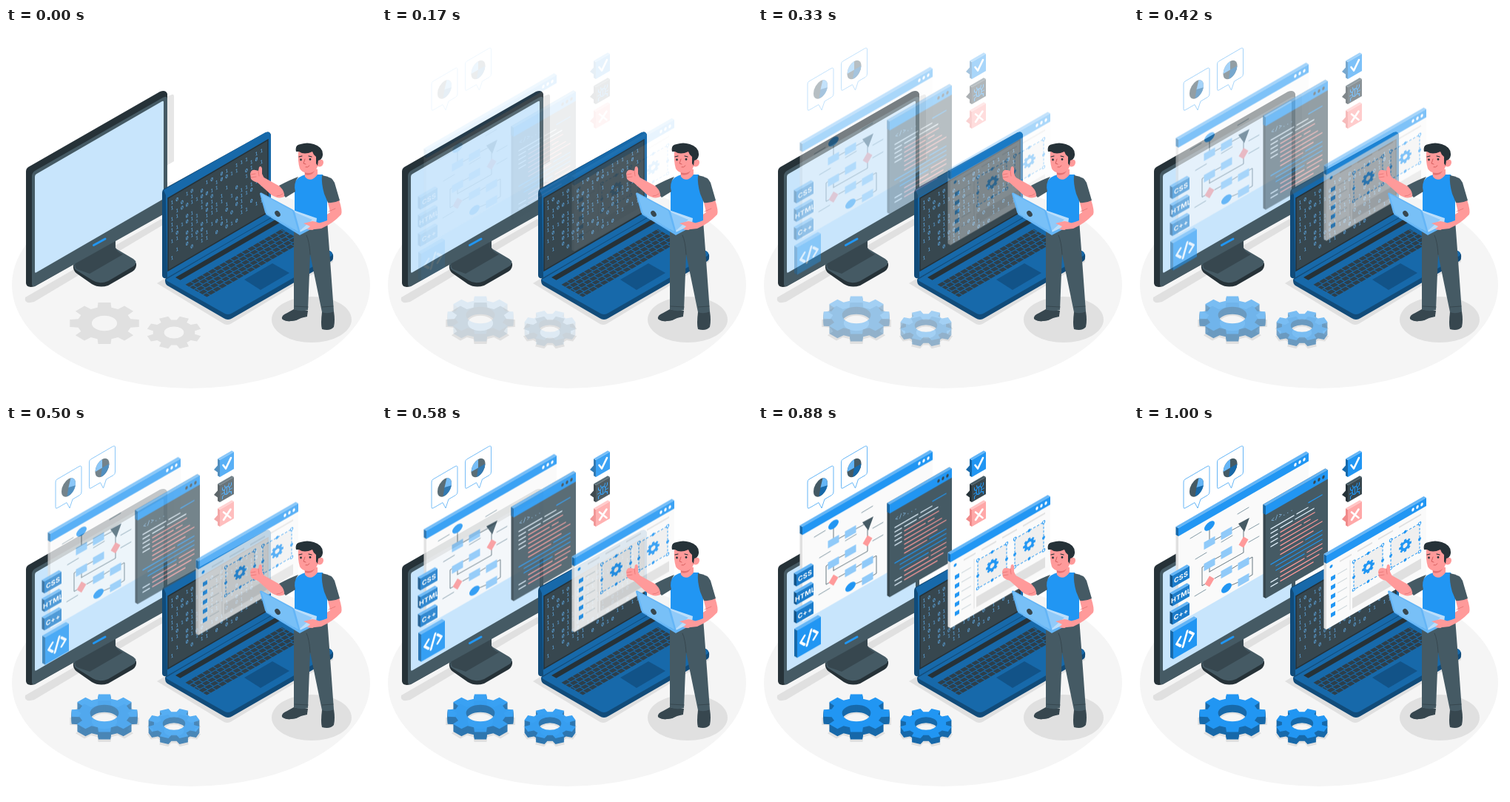
Recreate the animation shown at these times as an HTML page. Size 500 px wide and 500 px high, loop 1040 ms.

```html
<!DOCTYPE html>
<html lang="en">
<head>
<meta charset="utf-8">
<title>Development scene</title>
<style>
html, body { margin: 0; width: 100%; height: 100%; overflow: hidden; background: #fff; }
svg { display: block; width: 100vw; height: 100vh; }
.wall { transform: skewY(-30deg); }
.fade, .rise { animation: fade 1.04s infinite; }
.rise { animation-name: rise; }
@keyframes fade {
  0% { opacity: 0; animation-timing-function: cubic-bezier(.36, -.01, .5, 1.38); }
  96.15%, 100% { opacity: 1; }
}
@keyframes rise {
  0% { opacity: 0; transform: translateY(30px); animation-timing-function: cubic-bezier(.36, -.01, .5, 1.38); }
  96.15%, 100% { opacity: 1; transform: none; }
}
.line { fill: none; stroke-linecap: round; stroke-linejoin: round; }
.tag { font: 700 9px Inter, Roboto, sans-serif; fill: #fff; text-anchor: middle; letter-spacing: .2px; }
.bits { font: 6.5px "Noto Sans Mono", "DejaVu Sans Mono", monospace; fill: #64b5f6; text-anchor: middle; }
</style>
</head>
<body>
<svg viewBox="0 0 500 500">
  <defs>
    <rect id="step" class="wall" x="-7.5" y="-5" width="15" height="10" fill="#90caf9"/>
    <ellipse id="end" class="wall" rx="7" ry="5.5" fill="#2196f3"/>
    <path id="choice" class="wall" d="M0-7.5 6.5 0 0 7.5-6.5 0Z" fill="#ff9a9a"/>
    <path id="bubble" fill="#fff" stroke="#64b5f6" d="M69 72 99 54.5Q102 53 102 56V89Q102 92 99.5 93.5L90 99 86 111 82 103.5 69 111Q67 112 67 109.5V76Q67 73 69 72Z"/>
    <g id="frame">
      <path fill="#e0e0e0" fill-opacity=".45" d="M0 0H39V38H0Z"/>
      <path fill="none" stroke="#2196f3" stroke-dasharray="3 2" d="M0 0H39V38H0Z"/>
      <g fill="#fff" stroke="#2196f3"><circle r="1.7"/><circle cx="39" r="1.7"/><circle cy="38" r="1.7"/><circle cx="39" cy="38" r="1.7"/></g>
      <g fill="#2196f3"><circle cx="19.5" r="2"/><circle cy="21" r="2"/><circle cx="39" cy="21" r="2"/><circle cx="19.5" cy="38" r="2"/></g>
    </g>
  </defs>

  <ellipse cx="250" cy="347" rx="242" ry="140" fill="#f5f5f5"/>
  <g fill="#e0e0e0">
    <path d="M26 364 210 258 214 265 38 370Q24 374 26 364Z"/>
    <path fill="#e6e6e6" d="M217 93 224 90Q227 89 227 93V180L217 186Z"/>
    <path d="M204 345 217 337 300 388 442 310V316L305 399Q299 403 293 399Z"/>
    <ellipse cx="413" cy="394" rx="54" ry="31"/>
    <g id="gearShadows"></g>
  </g>

  <!-- monitor -->
  <path fill="#263238" d="M91 320Q90 328 96 332L116 346Q126 352 138 348L171 329Q177 325 176 318L150 300 105 310Z"/>
  <path fill="#455a64" d="M92 320Q90 316 96 313L140 290 150 299 172 312Q179 317 172 322L138 342Q126 347 117 341L96 328Q91 325 92 320Z"/>
  <path fill="#37474f" d="M95 316 107 310 148 285V297Q149 302 158 306L113 332 96 326Q91 321 95 316Z"/>
  <path fill="#263238" d="M27 194Q27 190 30 188L208 86Q216 83 218 89V244Q218 248 214 250L39 349Q28 352 27 345Z"/>
  <path fill="#455a64" d="M35 200Q35 196 39 193L212 94Q218 91 218 96V244Q218 249 214 251L39 349Q35 350 35 346Z"/>
  <path fill="#c8e5fc" d="M39 201Q39 198 41.500 197L211 99Q213 98 213 100V229Q213 231 211 232L41.500 330Q39 332 39 329Z"/>
  <path class="line" stroke="#2196f3" stroke-width="3" d="M118.500 293.500 134 285"/>

  <!-- open laptop -->
  <path fill="#114b79" d="M215 341Q215 338 218 337L358 256 439 302Q443 305 442 311 442 314 438 316L306 392Q300 396 294 392L218 348Q215 346 215 341Z"/>
  <path fill="#1769aa" d="M216 340 358 256 439 302Q444 306 438 309L306 385Q300 389 294 385L218 342Z"/>
  <g transform="matrix(1 -.577 1 .577 229 337)"><path fill="#263238" d="M0 0H135V6.500H0Z"/></g>
  <g id="keys" transform="matrix(1 -.577 1 .577 242 346.500)"></g>
  <path fill="#125388" d="M322 340 360 318 383 331 344 354Z"/>
  <path fill="#114b79" d="M211 223Q211 219 214 217L351 141Q357 139 358 145V257L217 338Q211 339 211 334Z"/>
  <path fill="#1769aa" d="M213 219 351 141Q357 139 358 145V256L218 337 216 226Z"/>
  <path fill="#37474f" stroke="#263238" stroke-width="1.500" d="M219 230 354 151V249L219 328Z"/>
  <g transform="translate(219 229)"><g class="wall bits" id="bits"></g></g>

  <!-- back window -->
  <g class="rise">
    <g data-win="60,138,176,128,11,#fafafa,#e0e0e0,#fff"></g>
    <path class="line" stroke="#455a64" stroke-width=".8" d="M102 140V155M109 154 118 149M132 141 143 135M148 142V153M148 163V171L102 197M109 180 118 175M102 190V197M132 193 140 188M155 180 160 177V201L155 204M95 189 92 191V216L97 213M109 206 118 201M132 215 141 211"/>
    <path class="line" stroke="#78909c" stroke-width=".9" d="M76 152 91 143M140 119 155 110M155 140 169 132M155 157 169 149M83 180 98 171M118 157 133 148M82 230 97 221"/>
    <use href="#end" x="102" y="135"/><use href="#end" x="125" y="219"/>
    <use href="#step" x="102" y="158"/><use href="#step" x="125" y="145"/>
    <use href="#step" x="102" y="187"/><use href="#step" x="125" y="171"/>
    <use href="#step" x="125" y="197"/><use href="#step" x="148" y="186"/><use href="#step" x="148" y="208"/>
    <use href="#choice" x="148" y="157"/><use href="#choice" x="102" y="210"/>
    <path fill="#455a64" d="M141 132 156 124 149 143Z"/>
  </g>

  <!-- code window -->
  <g class="rise">
    <g data-win="178,108,84,125,12,#455a64,#37474f,#37474f"></g>
    <g transform="translate(178 108)"><g class="wall line" stroke-width="1.400">
      <text x="7" y="27" font-family="Noto Sans Mono, monospace" font-size="8.500" fill="#90caf9">&lt;/&gt;...</text>
      <path stroke="#e3f2fd" d="M7 35H38M42 35H57M7 41H16M20 41H36M40 41H65M7 47H16M7 53H16M7 59H16M7 107H16M7 113H16"/>
      <path stroke="#ff9a9a" d="M20 47H66M20 53H48M52 53H60M20 59H70M20 65H76M20 71H64M20 77H50M56 95H76M20 101H52M56 101H76M20 107H72M20 113H64"/>
      <path stroke="#2196f3" d="M58 29H76M54 77H76M7 83H76M14 89H76M14 95H52"/>
    </g></g>
  </g>

  <!-- layout window -->
  <g class="rise">
    <g data-win="260,175,135,100,11,#fafafa,#e0e0e0,#fff"></g>
    <g transform="translate(260 175)"><g class="wall">
      <circle cx="6.500" cy="18.500" r="2" fill="#2196f3"/>
      <path stroke="#e0e0e0" stroke-width="2" d="M18 18.500H34M42 18.500H62M70 18.500H90M98 18.500H128"/>
      <path stroke="#e0e0e0" d="M32 25V92"/>
      <path stroke="#2196f3" stroke-width="6" stroke-dasharray="5.500 6.800" d="M9 32.500V88"/>
      <path stroke="#cfd8dc" stroke-width="1.200" d="M15 34H28M15 46.500H28M15 59H28M15 71H28M15 83.500H28"/>
      <rect x="35" y="78" width="93" height="14" fill="#e0e0e0"/>
      <use href="#frame" x="37" y="29.500"/><use href="#frame" x="87" y="29.500"/>
      <g id="icons" fill="#2196f3"></g>
    </g></g>
  </g>

  <!-- language tags -->
  <g class="rise" id="tags"></g>

  <!-- gears -->
  <g class="fade" id="gearA"></g>
  <g class="fade" id="gearB"></g>

  <!-- pie charts -->
  <g class="fade">
    <use href="#bubble"/><use href="#bubble" x="45.500" y="-27"/>
    <g transform="translate(84.500 83)"><g class="wall">
      <ellipse rx="9.500" ry="11.500" fill="#455a64"/>
      <path fill="#64b5f6" d="M0 0 3-10.900A9.500 11.500 0 0 1 4 10.400Z"/>
      <path fill="#1769aa" d="M0 0 9.300 2.500A9.500 11.500 0 0 1-2 11.200Z"/>
    </g></g>
    <g transform="translate(130 56.500)"><g class="wall">
      <ellipse rx="9.500" ry="11.500" fill="#455a64"/>
      <path fill="#64b5f6" d="M0 0-9.500 0A9.500 11.500 0 0 1 0-11.500Z"/>
      <path fill="#1769aa" d="M0 0 9.500 0A9.500 11.500 0 0 1-2 11.200Z"/>
    </g></g>
  </g>

  <!-- status boxes -->
  <g class="fade">
    <g id="status"></g>
    <g class="line" stroke="#fff" stroke-width="2.600">
      <path d="M293.500 53 297 57.500 304 43"/>
      <path d="M294 116.500 303.500 124M303.500 112.500 294 127" />
    </g>
    <g transform="translate(298.500 87)"><g class="wall line" stroke="#2196f3" stroke-width="1.100">
      <ellipse rx="3.500" ry="5"/>
      <path d="M0-5V5M-3.500-2-6-4V-7M3.500-2 6-4V-7M-3.500 1H-7M3.500 1H7M-3 3.500-6 5V8M3 3.500 6 5V8M-2-4.500-3-8M2-4.500 3-8"/>
    </g></g>
  </g>

  <!-- man -->
  <g fill="#37474f">
    <path d="M389 380 408 382 407 389Q399 391 392 395 378 398 373 393 372 388 380 385Z"/>
    <path d="M427 384 443 383Q445 395 443 404 438 410 427 407 425 400 427 384Z"/>
  </g>
  <path fill="#37474f" d="M373 392Q380 395 390 391L407 386V390Q399 391 392 395 378 398 373 393Z"/>
  <path fill="#455a64" d="M389 266 434 260 437 300 443 383Q435 387 427 384L411 306 408 381Q398 384 389 380Z"/>
  <path class="line" stroke="#37474f" d="M411 306Q410 288 406 280M427 377 442 376M390 376 408 377"/>
  <path fill="#ff9a9a" d="M435 236 450 232Q455 247 453 252 442 264 426 271L408 273Q400 271 402 264L420 262 438 249Z"/>
  <path fill="#2196f3" d="M390 208Q396 200 405 198L428 198Q434 212 434 228V260Q410 270 390 258Z"/>
  <path fill="#455a64" d="M427 199Q441 201 444 209L451 233Q443 237 435 236L430 224Q426 210 427 199Z"/>
  <path fill="#455a64" d="M395 201Q384 205 369 213 372 224 378 229L391 221Q388 210 395 201Z"/>
  <path fill="#ff9a9a" d="M345 200 370 214Q377 221 376 228 368 232 358 225L339 208Z"/>
  <path fill="#ff9a9a" d="M330 197Q331 191 337 192L341 193 342 188Q345 185 346 190L346 197 349 203 344 209Q335 209 331 204Z"/>
  <path class="line" stroke="#e57373" stroke-width=".8" d="M331 198 337 197M331 202 338 201M341 193 342 200M366 227Q371 227 374 224M436 248 445 244"/>
  <path fill="#bbdefb" d="M388 246 420 257 419 265 397 278Z"/>
  <path fill="#90caf9" d="M388 248 414 259 397 274Z"/>
  <path fill="#64b5f6" d="M351 252 397 276 414 268V271L397 280Z"/>
  <path fill="#64b5f6" d="M343 224Q343 222 345 222.500L387 245Q389 246 390 248L398 277 353 253Q351 252 350 249Z"/>
  <path fill="#78c0f7" d="M345 224 387 247 395 275 353 251Z"/>
  <ellipse cx="367" cy="251" rx="3.200" ry="4.500" transform="rotate(-38 367 251)" fill="#37474f"/>
  <path fill="#ff9a9a" d="M402 264 414 261Q422 262 427 266L414 273 407 272 411 268Z"/>
  <path fill="#ff9a9a" d="M403 191H421V198Q412 210 404 201Z"/>
  <path fill="#e57373" d="M404 195Q412 198 418 192L414 197Q409 200 404 198Z"/>
  <path fill="#ff9a9a" d="M395 167Q394 180 397 190 400 196 409 195.500 419 195 421 187 428 189 429 182 429 177 424 178L426 166Q410 158 395 167Z"/>
  <path fill="#263238" d="M392 167Q390 158 398 157 407 154 416 157 429 161 428 172 427 178 422 179L421 186 419 183 419 174Q415 171 414 167 403 172 396 167Z"/>
  <g fill="#263238"><circle cx="398.500" cy="178" r="1.400"/><circle cx="411" cy="177.500" r="1.400"/></g>
  <path class="line" stroke="#263238" stroke-width="1.200" d="M396 174 400 173M409 173 413 174"/>
  <path class="line" stroke="#d65f5f" d="M404 177 402 183 405 184M405 188Q408 189 410 186"/>
</svg>
<script>
const put = (id, html) => document.getElementById(id).innerHTML = html;
const BLUE = '#2196f3', DEEP = '#1769aa', PALE = '#64b5f6';

// Upright slab: front face with its left side and top edge
function slab(x, y, w, h, front, side, top, t = 3, inner = '') {
  const b = -1.155 * t;
  return `<g transform="translate(${x} ${y})"><g class="wall">
    <path fill="${side}" d="M0 0 ${-t} ${b}V${h + b}L0 ${h}Z"/>
    <path fill="${top}" d="M0 0 ${-t} ${b}H${w - t}L${w} 0Z"/>
    <path fill="${front}" d="M0 0H${w}V${h}H0Z"/>${inner}</g></g>`;
}

for (const el of document.querySelectorAll('[data-win]')) {
  const [x, y, w, h, bar, body, side, edge] = el.dataset.win.split(',');
  const dot = body === '#455a64' ? '#37474f' : '#fff';
  const dots = [18, 12, 6].map(d =>
    `<ellipse cx="${w - d}" cy="${bar / 2}" rx="1.7" ry="2.2" fill="${dot}"/>`).join('');
  el.innerHTML = slab(x, y, +w, +h, body, side, edge, 3.5) +
    slab(x, y, +w, +bar, BLUE, DEEP, PALE, 3.5, dots);
}

function gear(r, squash, turn = 0, hole = .43) {
  const pts = [];
  for (let i = 0; i < 8; i++)
    for (const [da, k] of [[-.26, .77], [-.18, 1], [.18, 1], [.26, .77]]) {
      const a = i * Math.PI / 4 + da + turn;
      pts.push(`${(r * k * Math.cos(a)).toFixed(2)} ${(r * k * Math.sin(a) * squash).toFixed(2)}`);
    }
  const hx = r * hole, arc = `A${hx} ${hx * squash} 0 0 1 `;
  return `M${pts.join('L')}ZM${-hx} 0${arc}${hx} 0${arc}${-hx} 0Z`;
}

const flat = (x, y, d, fill = '') =>
  `<path transform="translate(${x} ${y})" fill-rule="evenodd" ${fill && `fill="${fill}"`} d="${d}"/>`;

function solidGear(x, y, r, depth, turn) {
  const d = gear(r, .577, turn);
  let out = '';
  for (let z = depth; z > 0; z--) out += flat(x, y + z, d, DEEP);
  return out + flat(x, y, d, BLUE);
}

const TURN = Math.PI / 8;
put('gearShadows', flat(133, 399, gear(47.500, .6, 0, .36)) + flat(227, 411.500, gear(37, .6, TURN, .36)));
put('gearA', solidGear(133, 388, 45, 10, 0));
put('gearB', solidGear(227, 402, 35.500, 8, TURN));
put('icons', [56.500, 106.500].map(x => flat(x, 48, gear(8.500, 1, 0, .36))).join(''));

const label = s => `<text class="tag" x="11.500" y="11.500">${s}</text>`;
const code = '<path class="line" stroke="#fff" stroke-width="3" d="M10 13 4.500 19 10 25M19 10 13 28M22 13 27.500 19 22 25"/>';
put('tags', ['CSS', 'HTML', 'C++'].map((s, i) =>
  slab(52, 202.500 + i * 25, 23, 16, '#1b7ccb', '#125388', PALE, 3.500, label(s))).join('') +
  slab(53, 278, 32, 37, BLUE, DEEP, PALE, 4, code));

put('status', [[46, BLUE, DEEP, PALE], [80, '#37474f', '#263238', '#455a64'], [113, '#ffa8a8', '#f08a8a', '#ffc4c4']]
  .map(([y, front, side, top]) =>
    `<path fill="${side}" d="M288 ${y + 5} 281 ${y + 13} 288 ${y + 18}Z"/>` +
    slab(289, y, 19, 23, front, side, top)).join(''));

put('keys', [0, 1, 2, 3, 4].map(i =>
  `<path stroke="#2d3f4b" stroke-width="5" stroke-dasharray="6.600 1" stroke-dashoffset="${i * 2.500}" d="M0 ${3 + i * 6}H130"/>`).join(''));

let seed = 11;
const rand = () => (seed = seed * 16807 % 2147483647) / 2147483647;
let bits = '';
for (let c = 0; c < 19; c++)
  for (let r = 0; r < 11; r++)
    if (rand() < .58)
      bits += `<text x="${5.500 + c * 6.700}" y="${12 + r * 7.500}">${rand() < .6 ? 1 : 0}</text>`;
put('bits', bits);
</script>
</body>
</html>
```
